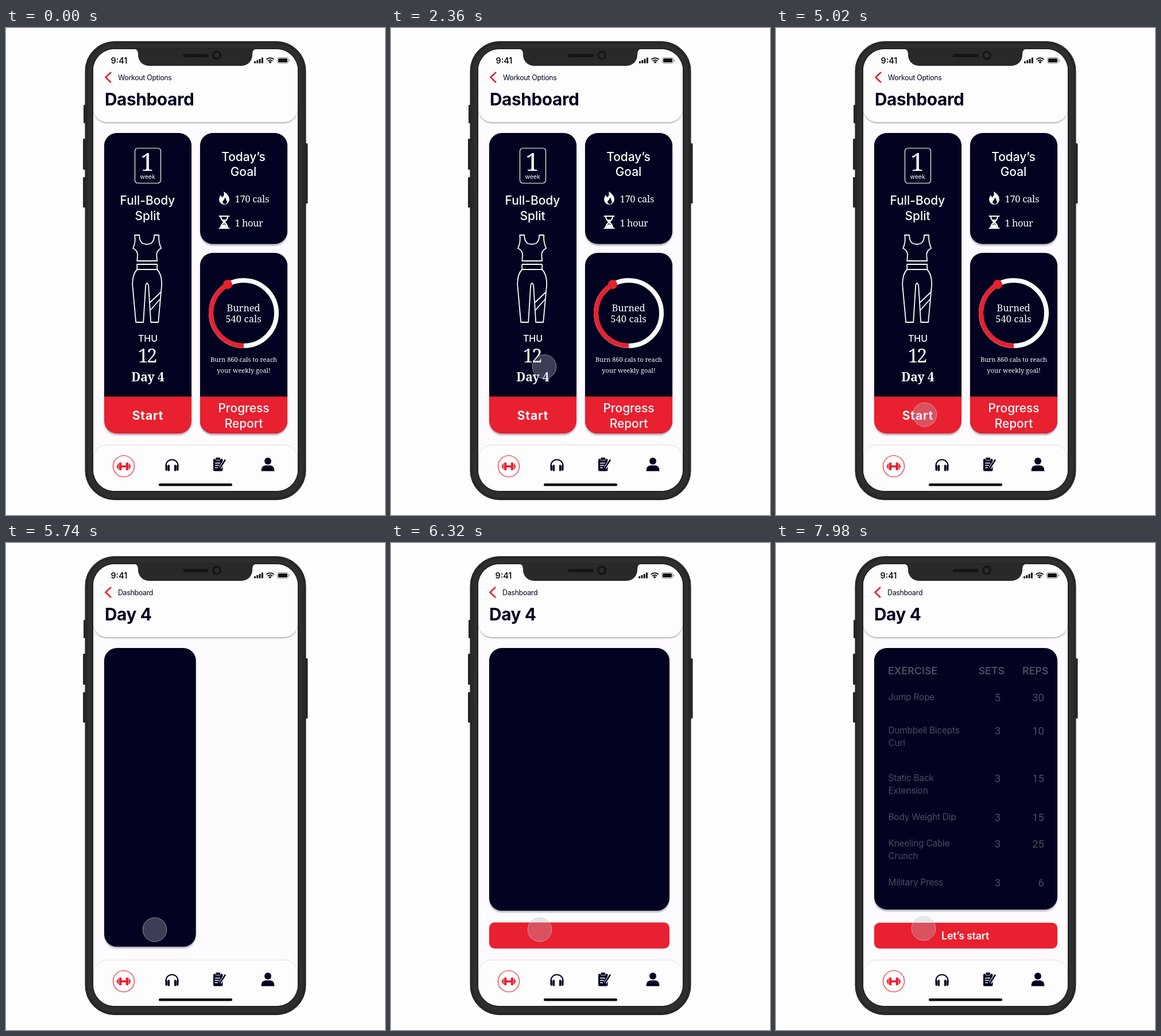
Write an HTML page that moves like this. It is 660x849 px and loops after 8000 ms.

```html
<!DOCTYPE html>
<html lang="en">
<head>
<meta charset="utf-8">
<title>Workout dashboard</title>
<style>
  html, body { margin: 0; width: 100%; height: 100%; overflow: hidden; background: #fefefe; }
  svg { display: block; width: 100vw; height: 100vh; }
  :root { --navy: #010320; --red: #e9202f; --loop: 8s linear infinite; }

  text { font-family: Inter, sans-serif; fill: var(--navy); }
  .light text { fill: #fff; text-anchor: middle; }
  .light .left { text-anchor: start; }
  .slab { font-family: "Noto Serif", serif; }
  .head { font-size: 20.9px; font-weight: 500; }
  .stat { font-size: 16.5px; letter-spacing: -.3px; }
  .note { font-size: 11px; }
  .back { font-size: 12.4px; letter-spacing: -.3px; }
  .title { font-size: 29.8px; font-weight: 700; letter-spacing: -.4px; }

  .navy { fill: var(--navy); }
  .red { fill: var(--red); }
  .white { fill: #fff; }
  .line { fill: none; stroke: #fff; stroke-width: 1.8; stroke-linejoin: round; stroke-linecap: round; }
  .lift { filter: drop-shadow(0 3px 1px rgba(40, 40, 70, .32)); }

  .table text { fill: #fff; }
  .table .th { font-size: 17.8px; font-weight: 600; }
  .table .name { font-size: 15.4px; letter-spacing: -.2px; }
  .table .num { font: 400 18.5px Roboto, sans-serif; text-anchor: middle; }
  .table .reps { text-anchor: end; }

  .dash { animation: leave var(--loop); animation-timing-function: step-end; }
  .day { animation: enter var(--loop); animation-timing-function: step-end; }
  .nudge { animation: nudge var(--loop); }
  .panel { animation: panel var(--loop); }
  .button { animation: button var(--loop), reveal var(--loop); }
  .label { animation: label var(--loop); }
  .table { animation: table var(--loop); }
  .touch { animation: touch var(--loop), show var(--loop); }

  @keyframes leave { 0% { visibility: visible } 70.25%, 100% { visibility: hidden } }
  @keyframes enter { 0% { visibility: hidden } 70.25%, 100% { visibility: visible } }
  @keyframes nudge {
    0%, 70.25% { transform: translateX(0); animation-timing-function: ease-in-out }
    80.25%, 100% { transform: translateX(-1px) }
  }
  @keyframes panel {
    0%, 70.25% { width: 152px; height: 524px; animation-timing-function: ease-in-out }
    80.25%, 100% { width: 319px; height: 456px }
  }
  @keyframes button {
    0%, 70.25% { y: 643px; width: 152px; height: 64px; rx: 22px; animation-timing-function: ease-in-out }
    80.25%, 100% { y: 662px; width: 319px; height: 45px; rx: 9px }
  }
  @keyframes reveal { 0%, 71.8% { opacity: 0 } 74%, 100% { opacity: 1 } }
  @keyframes label { 0%, 88.25% { opacity: 0 } 92.5%, 100% { opacity: 1 } }
  @keyframes table { 0%, 94.25% { opacity: 0 } 100% { opacity: .31 } }
  @keyframes show { 0%, 10.5% { opacity: 0 } 12%, 100% { opacity: 1 } }
  @keyframes touch {
    0%, 11% { transform: translate(421px, 106px); animation-timing-function: cubic-bezier(.4, 0, .667, .533) }
    19.5% { transform: translate(343px, 290px) }
    29.5% { transform: translate(267px, 590px); animation-timing-function: cubic-bezier(.3, .53, .6, 1) }
    34.5%, 45.75% { transform: translate(259px, 669px); animation-timing-function: ease-in-out }
    51%, 94.25% { transform: translate(259px, 674px); animation-timing-function: ease-in-out }
    99.75%, 100% { transform: translate(257px, 672px) }
  }
</style>
</head>
<body>
<svg viewBox="0 0 660 849">
  <defs>
    <clipPath id="screen"><rect x="152" y="37" width="356" height="770" rx="37"/></clipPath>
    <clipPath id="plan"><rect x="171" y="183" width="152" height="524" rx="22"/></clipPath>
    <clipPath id="report"><rect x="338" y="392" width="152" height="315" rx="22"/></clipPath>
  </defs>

  <!-- phone body -->
  <g fill="#242628">
    <rect x="135" y="134" width="6" height="32" rx="1.5"/>
    <rect x="134" y="193" width="6" height="54" rx="1.5"/>
    <rect x="134" y="260" width="6" height="53" rx="1.5"/>
    <rect x="519" y="201" width="6.5" height="105" rx="1.5"/>
  </g>
  <rect x="138" y="23.5" width="384" height="799" rx="51" fill="#2c2e30" stroke="#1b1c1e"/>
  <rect x="141" y="26.5" width="378" height="793" rx="48" fill="none" stroke="#222426" stroke-width="2"/>
  <rect x="150.5" y="35.5" width="359" height="773" rx="38.5" fill="#1b1c1e"/>
  <rect x="152" y="37" width="356" height="770" rx="37" fill="#fdfbfd"/>

  <!-- header and tab bar -->
  <g clip-path="url(#screen)">
    <path style="filter:drop-shadow(0 2px .8px rgba(30,30,50,.32))" fill="#fefdfe"
      d="M152 30H508V140a24 24 0 0 1-24 24H176a24 24 0 0 1-24-24Z"/>
    <path d="M152 810V750a23 23 0 0 1 23-23H485a23 23 0 0 1 23 23V810Z" fill="#fefdfe" stroke="#dcdbe0"/>
  </g>
  <path d="M222 36q8 1 8 9v2a19 19 0 0 0 19 19H410a19 19 0 0 0 19-19v-2q0-8 8-9Z" fill="#27292b"/>
  <rect x="308" y="45" width="45" height="6" rx="3" fill="#151618"/>
  <circle cx="367" cy="47.5" r="8" fill="#141517"/>
  <circle cx="367" cy="47.5" r="4.5" fill="#292b2e"/>

  <g class="nudge">
    <text x="182.5" y="61.5" font-size="14.3" font-weight="600" style="fill:#111">9:41</text>
    <g fill="#111">
      <rect x="432" y="58" width="3" height="3.5" rx=".6"/>
      <rect x="436.3" y="56" width="3" height="5.5" rx=".6"/>
      <rect x="440.6" y="54" width="3" height="7.5" rx=".6"/>
      <rect x="444.9" y="51.5" width="3" height="10" rx=".6"/>
      <path d="M460 62l-2.6-2.7a3.7 3.7 0 0 1 5.2 0Z"/>
      <path d="M455.8 57.6a6 6 0 0 1 8.4 0M453.4 54.9a9.4 9.4 0 0 1 13.2 0" fill="none" stroke="#111" stroke-width="2"/>
      <rect x="472.5" y="51.5" width="19" height="10" rx="2.8" fill="none" stroke="#888"/>
      <rect x="474" y="53" width="16" height="7" rx="1.5"/>
      <rect x="492.6" y="55" width="1.4" height="3.5" rx=".7" fill="#888"/>
    </g>
    <path d="M183 77l-9.5 9 9.5 9" fill="none" stroke="#e9202f" stroke-width="2.6"/>
    <g class="dash">
      <text class="back" x="195" y="90.5">Workout Options</text>
      <text class="title" x="172" y="135">Dashboard</text>
    </g>
    <g class="day">
      <text class="back" x="195" y="90.5">Dashboard</text>
      <text class="title" x="172" y="135">Day 4</text>
    </g>
  </g>

  <!-- dashboard cards -->
  <g class="dash light">
    <g class="lift">
      <g clip-path="url(#plan)">
        <path class="navy" d="M171 183h152v524h-152z"/>
        <path class="red" d="M171 642.5h152v65h-152z"/>
      </g>
      <rect class="navy" x="338" y="183" width="152" height="193.5" rx="22"/>
      <g clip-path="url(#report)">
        <path class="navy" d="M338 392h152v315h-152z"/>
        <path class="red" d="M338 642.5h152v65h-152z"/>
      </g>
    </g>

    <rect class="line" x="224.5" y="209.5" width="45" height="61" rx="5" style="stroke-width:1.2"/>
    <text class="slab" x="246" y="249" font-size="43" font-weight="300">1</text>
    <text x="246.5" y="263" font-size="10.5">week</text>
    <text class="head" x="246.5" y="308">Full-Body</text>
    <text class="head" x="246.5" y="335">Split</text>

    <g class="line" transform="translate(-.8 0)">
      <path d="M225 361h8q0 10 5 14q8 4 16 0q5-4 5-14h8q-1 12 4 23q-8 4-8 12l1 10h-35l1-10q0-8-8-12q5-11 3-23Z"/>
      <path d="M229 412h35v9h-35Z"/>
      <path d="M229 421q-8 8-8 26l6 66h13l4-64q2-8 5 0l4 64h13l6-66q0-18-8-26"/>
      <path d="M270 461l-18 17M269 473l-16 18"/>
    </g>
    <text x="247" y="547" font-size="16" font-weight="500">THU</text>
    <text class="slab" x="245" y="582.5" font-size="33" font-weight="300" letter-spacing="-3">12</text>
    <text class="slab" x="247" y="616" font-size="21" font-weight="700">Day 4</text>
    <text x="247" y="683" font-size="21" font-weight="700" letter-spacing=".8">Start</text>

    <text class="head" x="413.5" y="232">Today’s</text>
    <text class="head" x="413.5" y="258">Goal</text>
    <path class="white" fill-rule="evenodd" d="M379 285q10 6 10 14a9 9 0 0 1-18 0q0-4 3-8q1 4 3 4q4-3 2-10ZM381 295q0 4-3 6a3.7 3.7 0 1 0 6 0q0-3-3-6Z"/>
    <path class="line" d="M371.5 328h17M371.5 349h17M374 328q0 6 6 10.5q-6 4.500-6 10.500M386 328q0 6-6 10.500q6 4.500 6 10.500" style="stroke-width:2.200"/>
    <path class="white" d="M376 334h8l-4 4zM375 348q1-5 5-6q4 1 5 6z"/>
    <text class="slab stat left" x="398.5" y="304">170 cals</text>
    <text class="slab stat left" x="398.5" y="346" style="letter-spacing:-.5px">1 hour</text>

    <g fill="none" stroke-width="8">
      <circle cx="414" cy="497" r="57" stroke="#fff"/>
      <path d="M414 554A57 57 0 0 1 386 447.4" stroke="#e9202f"/>
    </g>
    <circle class="red" cx="386" cy="447" r="8"/>
    <text class="slab stat" x="413.5" y="494" style="letter-spacing:-.1px">Burned</text>
    <text class="slab stat" x="413.5" y="513" style="letter-spacing:.1px">540 cals</text>
    <text class="slab note" x="414" y="582">Burn 860 cals to reach</text>
    <text class="slab note" x="414" y="601">your weekly goal!</text>
    <text class="head" x="414" y="670">Progress</text>
    <text class="head" x="414" y="697">Report</text>
  </g>

  <!-- day plan: the button waits behind the panel -->
  <g class="day">
    <rect class="button red" x="171" y="643" width="152" height="64" rx="22"/>
    <rect class="panel navy lift" x="171" y="183" width="152" height="524" rx="22"/>
    <g class="light"><text class="label" x="329.5" y="691" font-size="18" font-weight="600" letter-spacing="-.3">Let’s start</text></g>
    <g class="table" id="table">
      <text class="th" x="195" y="229">EXERCISE</text>
      <text class="th" x="352.5" y="229">SETS</text>
      <text class="th" x="429" y="229">REPS</text>
    </g>
  </g>

  <!-- tab icons -->
  <g class="red">
    <circle cx="205" cy="764" r="18.5" fill="none" stroke="#e9202f" stroke-width="1.2"/>
    <path d="M199 762.5h12v3.5h-12z"/>
    <rect x="197" y="757.5" width="4.3" height="13.5" rx="1.3"/>
    <rect x="208.7" y="757.5" width="4.3" height="13.5" rx="1.3"/>
    <path d="M194.3 759.5h2v9.5h-2zM213.7 759.5h2v9.5h-2z"/>
    <rect x="192.8" y="762.5" width="2" height="3.5"/><rect x="215.2" y="762.5" width="2" height="3.5"/>
  </g>
  <g class="navy">
    <path d="M278.5 765v-2.500a10.500 10 0 0 1 21 0v2.500" fill="none" stroke="#010320" stroke-width="2"/>
    <rect x="277.5" y="762" width="4" height="10" rx="2"/><rect x="282" y="761.5" width="3" height="11" rx="1"/>
    <rect x="296.5" y="762" width="4" height="10" rx="2"/><rect x="293" y="761.5" width="3" height="11" rx="1"/>
    <rect x="361" y="751" width="16.5" height="21.5" rx="2"/>
    <rect x="365" y="748.5" width="8.5" height="5" rx="1.5" stroke="#fefdfe" stroke-width=".8"/>
    <path d="M364 758.5h9M364 762.5h7M364 766.5h5" stroke="#fff" stroke-width="1.3"/>
    <path d="M381.5 753.5l-8.5 13.5" stroke="#fefdfe" stroke-width="5"/>
    <path d="M382 752.5l-9 14" stroke="#010320" stroke-width="2.6"/>
    <path d="M371.7 765.8l2.5 1.7-3 2.2z"/>
    <circle cx="456" cy="755" r="6"/>
    <path d="M444.5 772.5q0-10 8-10h7q8 0 8 10z"/>
  </g>
  <rect x="266" y="794" width="128" height="4.5" rx="2" fill="#050505"/>

  <circle class="touch" r="20.8" fill="rgba(188,188,198,.32)" stroke="rgba(200,200,208,.65)"/>
</svg>
<script>
  const rows = [
    [274, ["Jump Rope"], 5, 30],
    [332, ["Dumbbell Bicepts", "Curl"], 3, 10],
    [415, ["Static Back", "Extension"], 3, 15],
    [483, ["Body Weight Dip"], 3, 15],
    [529, ["Kneeling Cable", "Crunch"], 3, 25],
    [597, ["Military Press"], 3, 6],
  ];
  const cell = (kind, x, y, label) => `<text class="${kind}" x="${x}" y="${y}">${label}</text>`;
  document.getElementById("table").innerHTML += rows.map(([y, lines, sets, reps]) =>
    lines.map((line, i) => cell("name", 195.5, y + i * 22.3, line)).join("") +
    cell("num", 386, y + 1.5, sets) + cell("num reps", 467, y + 1.5, reps)
  ).join("");
</script>
</body>
</html>
```
